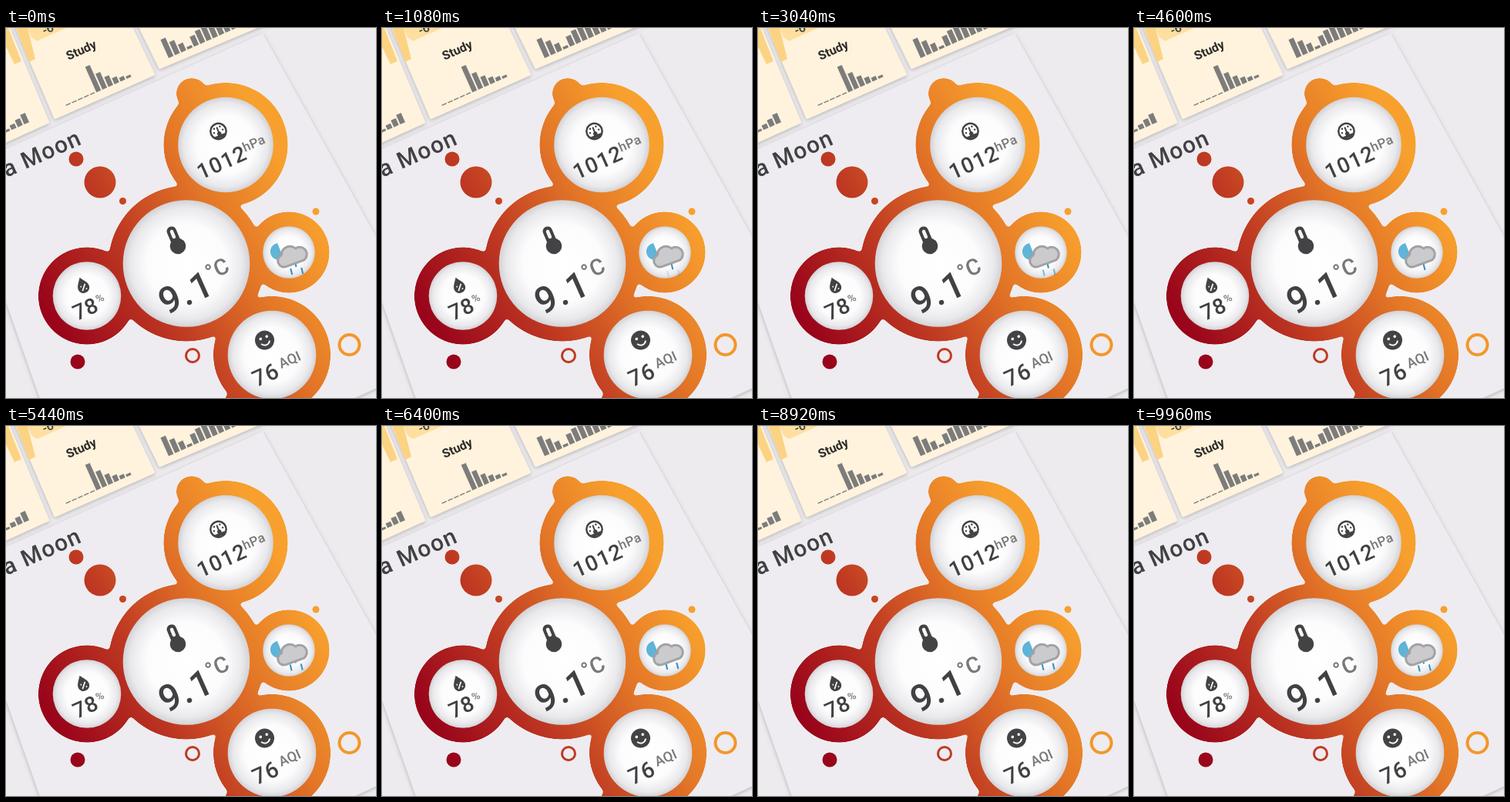
An HTML page that plays this animation: 480 px wide and 480 px high, repeating every 10 s.

```html
<!DOCTYPE html>
<html lang="en">
<head>
<meta charset="utf-8">
<style>
  html, body { margin: 0; width: 100%; height: 100%; overflow: hidden; background: #edebee; }
  svg { display: block; width: 100vw; height: 100vh; font-family: Roboto, sans-serif; font-weight: 500; }
  text { fill: #414143; }
  .unit { fill: #78787a; }
  .name { fill: #2c2a28; font-weight: 700; }
  .tile { fill: #fff3dd; stroke: #fff3dd; stroke-width: 4; stroke-linejoin: round; }
  .bars { fill: #7d7c7c; }
  .dark { fill: #434345; }
  .line { fill: none; stroke: #434345; stroke-linecap: round; }
  .white { fill: none; stroke: #f7f7f7; stroke-linecap: round; }
</style>
</head>
<body>
<svg viewBox="0 0 480 480">
  <defs>
    <linearGradient id="heat" gradientUnits="userSpaceOnUse" x1="43" y1="350" x2="356" y2="166">
      <stop offset="0" stop-color="#99041a"/>
      <stop offset=".38" stop-color="#c03b22"/>
      <stop offset=".69" stop-color="#e37627"/>
      <stop offset="1" stop-color="#f8a02d"/>
    </linearGradient>
    <radialGradient id="dial">
      <stop offset="0" stop-color="#fff"/>
      <stop offset=".62" stop-color="#fcfcfd"/>
      <stop offset=".88" stop-color="#e9e9ec"/>
      <stop offset="1" stop-color="#d3d2d6"/>
    </radialGradient>
    <filter id="soft" x="-20%" y="-20%" width="140%" height="140%">
      <feDropShadow dx="0" dy="1.5" stdDeviation="2.5" flood-color="#77747c" flood-opacity=".5"/>
    </filter>
    <!-- rounds the corners where rings meet -->
    <filter id="merge" color-interpolation-filters="sRGB">
      <feGaussianBlur stdDeviation="2.5"/>
      <feColorMatrix values="1 0 0 0 0  0 1 0 0 0  0 0 1 0 0  0 0 0 10 -4.5"/>
    </filter>
  </defs>

  <rect width="480" height="480" fill="#edebee"/>
  <path d="M333 7L567 427L101 643L-60 184Z" fill="#eeecf0" filter="url(#soft)"/>

  <g filter="url(#soft)">
    <path class="tile" d="M-10 -20L2 -2L54 122L-10 151Z"/>
    <path class="tile" d="M6 -20L64 116L191 60L153 -20Z"/>
    <path class="tile" d="M165 -20L200 51L340 -8V-20Z"/>
  </g>
  <path d="M0 0H3L20 43L11 47L0 24ZM13 0H28L38 40L30 44Z" fill="#fbd383"/>
  <path d="M28 0H78L40 17L33 12Z" fill="#fedf9f"/>
  <g class="bars" id="charts"></g>

  <g fill="url(#heat)">
    <g filter="url(#merge)">
      <g id="rings">
        <circle cx="285" cy="151.5" r="80.5"/>
        <circle cx="234" cy="305.5" r="101"/>
        <circle cx="105" cy="347.5" r="63"/>
        <circle cx="367" cy="291" r="52.5"/>
        <circle cx="345" cy="424" r="76"/>
      </g>
      <circle cx="241" cy="85" r="20"/>
      <circle cx="303" cy="488" r="20"/>
    </g>
    <circle cx="91" cy="170" r="9.5"/>
    <circle cx="122" cy="200" r="20.5"/>
    <circle cx="151.5" cy="224.5" r="4.5"/>
    <circle cx="93" cy="433" r="9.5"/>
    <circle cx="402" cy="238" r="4.5"/>
  </g>
  <g fill="none" stroke="url(#heat)">
    <circle cx="242" cy="425" r="8.5" stroke-width="3"/>
    <circle cx="445.5" cy="411" r="13" stroke-width="4" stroke="#f3972b"/>
  </g>
  <g fill="url(#dial)" id="dials"></g>
  <g id="labels"></g>

  <!-- pressure -->
  <g transform="translate(275.5 134) rotate(-22)">
    <circle class="line" r="10.2" stroke-width="2.4"/>
    <path class="line" d="M0 3V-5" stroke-width="2"/>
    <circle class="dark" cy="3.5" r="2.8"/>
    <path class="dark" d="M-8 5H8L4 9H-4Z"/>
    <path class="line" d="M-6 0h.1M6 0h.1M-4 -5h.1M4 -5h.1" stroke-width="2.4"/>
  </g>

  <!-- temperature -->
  <g transform="translate(223 283) rotate(-23)">
    <path class="line" d="M0 0V-21" stroke-width="12.5"/>
    <circle class="dark" r="10.3"/>
    <path class="white" d="M0 -13V-20.5" stroke-width="4.5"/>
  </g>

  <!-- humidity -->
  <g transform="translate(100 335) rotate(-22)">
    <path class="dark" d="M0 -12C3 -7 7.5 -3 7.5 2A7.5 7 0 0 1 -7.5 2C-7.5 -3 -3 -7 0 -12Z"/>
    <path class="white" d="M-2.5 5L3 -1.5M-2.8 -.5h.1M3 4.5h.1" stroke-width="1.8"/>
  </g>

  <!-- air quality -->
  <g transform="translate(335.5 405) rotate(-22)">
    <circle class="dark" r="12.5"/>
    <path class="white" d="M-4.3 -3.5h.1M4.3 -3.5h.1" stroke-width="3.6"/>
    <path class="white" d="M-5.5 3.5A6.5 6.5 0 0 0 5.5 3.5" stroke-width="2"/>
  </g>

  <!-- weather -->
  <path d="M352 279A11 11 0 1 0 360 299Z" fill="#5fb4d8"/>
  <g id="rain" stroke="#3290c4" stroke-width="2"></g>
  <path transform="translate(371 294) rotate(-20)" d="M-12 12a8 8 0 0 1-1-16a11 11 0 0 1 20-2a9 9 0 0 1 5 18z"
        fill="#cbcbcd" stroke="#a2a2a5" stroke-width="3" stroke-linejoin="round"/>
</svg>
<script>
const TILT = -24, RING_WIDTH = 18.7, FALL_TIME = 500, FALL = 20, DRIFT = 5;
const byId = id => document.getElementById(id);
const add = (id, markup) => byId(id).insertAdjacentHTML('beforeend', markup);

for (const ring of byId('rings').children) {
  const dial = ring.cloneNode();
  dial.setAttribute('r', ring.getAttribute('r') - RING_WIDTH);
  byId('dials').append(dial);
}

function label(text, x, y, size, kind = '', spacing = 0) {
  add('labels', `<text class="${kind}" font-size="${size}" letter-spacing="${spacing}"
    transform="translate(${x} ${y}) rotate(${TILT})">${text}</text>`);
}
label('-6', 50, 9, 16);
label('Study', 81, 42, 16, 'name');
label('a Moon', 1, 194, 30, '', 1.3);
label('1012', 253, 197, 28, '', 1);
label('hPa', 310, 161, 17, 'unit', 0.3);
label('9.1', 207, 373, 48, '', 1.5);
label('°C', 264, 328, 29, 'unit', 0.5);
label('78', 92, 380, 28, '', 0.5);
label('%', 119, 357, 14, 'unit');
label('76', 325, 466, 29, '', 1);
label('AQI', 357, 442, 18, 'unit');

function chart(x, y, step, count, height) {
  add('charts', `<g transform="translate(${x} ${y}) rotate(${TILT})">` +
    Array.from({ length: count }, (_, i) =>
      `<rect x="${i * step}" y="${-height(i)}" width="${step - 2}" height="${height(i)}"/>`).join('') + '</g>');
}
chart(-1, 136, 9, 4, i => 3 + 3.4 * i);
chart(78, 101, 8.6, 11, i => i < 5 ? 1.5 : Math.max(1.5, 36 * 0.62 ** (i - 5)));
chart(211, 39, 9, 12, i => i < 4 ? 26 - 7.5 * i : 14 + 4 * (i - 4));

function drop(x, top, phase) {
  add('rain', '<path d="M-1 -4L1 4"/>');
  const path = byId('rain').lastElementChild;
  return time => {
    const p = (time / FALL_TIME + phase) % 1;
    path.setAttribute('transform', `translate(${x + DRIFT * p} ${top + FALL * p})`);
    path.setAttribute('opacity', Math.max(0, Math.min(1, (0.85 - p) * 5)));
  };
}
const drops = [drop(367, 303, 0.65), drop(374, 300, 0.3), drop(381, 302, 0.65)];

const start = performance.now();
function tick() {
  const time = Math.floor((performance.now() - start) % 10000 / 40) * 40;
  drops.forEach(place => place(time));
  requestAnimationFrame(tick);
}
tick();
</script>
</body>
</html>
```
